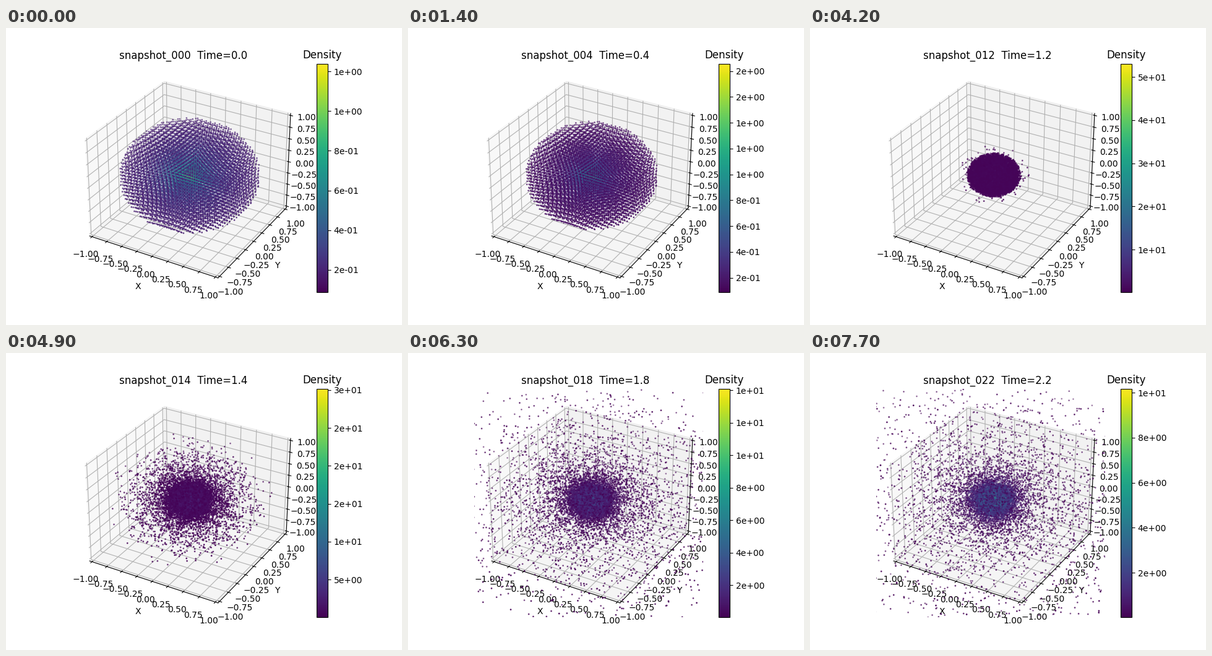
A matplotlib script that plays this animation: 640 by 480 pixels, repeating every 8 s.

```python
import numpy as np
import matplotlib.pyplot as plt
from matplotlib.animation import FuncAnimation

LOOP_MS = 8000
SNAPS = 23
GRID = 28
T_BOUNCE = 1.2

# highest density at a few key times, joined on a log scale
KEY_TIMES = [0, 0.4, 0.8, 1.2, 1.6, 2.0, 2.2]
KEY_PEAKS = [1.239, 1.858, 21.7, 53.1, 17.15, 11.6, 10.18]


def stretched_sphere():
    """Cubic lattice stretched so that density falls as 1/r."""
    c = (np.arange(GRID) - (GRID - 1) / 2) * 2 / GRID
    p = np.stack(np.meshgrid(c, c, c, indexing="ij"), -1).reshape(-1, 3)
    r = np.linalg.norm(p, axis=1)
    p, r = p[r < 1], r[r < 1]
    return p / r[:, None], r ** 1.5


rng = np.random.default_rng(4)
dirs, r0 = stretched_sphere()
count = len(r0)
jitter = rng.normal(size=(count, 3))
flicker = rng.normal(size=count)
mixed = r0 ** 2 + 0.15 * rng.normal(size=count)
rank = np.argsort(np.argsort(mixed)) / (count - 1)
bounce = 0.385 * np.sqrt(rank) + 0.13 * np.clip((rank - 0.99) / 0.01, 0, 1)

# cycloid of a shell falling freely from rest
eta = np.linspace(0, np.pi / 2, 400)
fall_time = (eta + np.sin(2 * eta) / 2) / np.sqrt(2)
fall_size = np.cos(eta) ** 2


def radii(t):
    if t >= T_BOUNCE:
        return bounce + 3.4 * rank ** 6 * (t - T_BOUNCE)
    infall = r0 * np.interp(0.85 * t / np.sqrt(r0), fall_time, fall_size)
    return np.maximum(infall, bounce * (t / T_BOUNCE) ** 3)


def particles(t):
    d = dirs + min(0.25, 0.04 * t ** 4) * jitter
    d /= np.linalg.norm(d, axis=1)[:, None]
    r = radii(t)
    return r, r[:, None] * d


def density_range(t):
    low = 0.087 if t <= T_BOUNCE else 0.02
    return low, np.exp(np.interp(t, KEY_TIMES, np.log(KEY_PEAKS)))


def density(r, t, low, high):
    before = max(0, 1 - t / T_BOUNCE)
    after = max(0, t - T_BOUNCE)
    core = 0.03 + 0.15 * before ** 1.5 + 0.09 * after
    rho = low + (high - low) / (1 + (r / core) ** (1.4 + 0.3 * t))
    return np.clip(rho * np.exp(0.1 * t * flicker), low, high)


fig = plt.figure(figsize=(6.4, 4.8), dpi=100)


def draw(i):
    fig.clear()
    t = i / 10
    r, pos = particles(t)
    low, high = density_range(t)

    ax = fig.add_subplot(projection="3d")
    dots = ax.scatter(*pos.T, c=density(r, t, low, high), s=1,
                      cmap="viridis", vmin=low, vmax=high)
    for set_lim in (ax.set_xlim, ax.set_ylim, ax.set_zlim):
        set_lim(-1, 1, view_margin=1 / 48)
    ax.set_xlabel("X")
    ax.set_ylabel("Y")
    ax.set_title(f"snapshot_{i:03d}  Time={t:.1f}  ")

    bar = fig.colorbar(dots, ax=ax, format="%.0e")
    bar.ax.set_title("Density")
    return []


anim = FuncAnimation(fig, draw, frames=SNAPS, init_func=lambda: [],
                     interval=LOOP_MS / SNAPS, repeat=True, repeat_delay=0)
plt.show()
```
